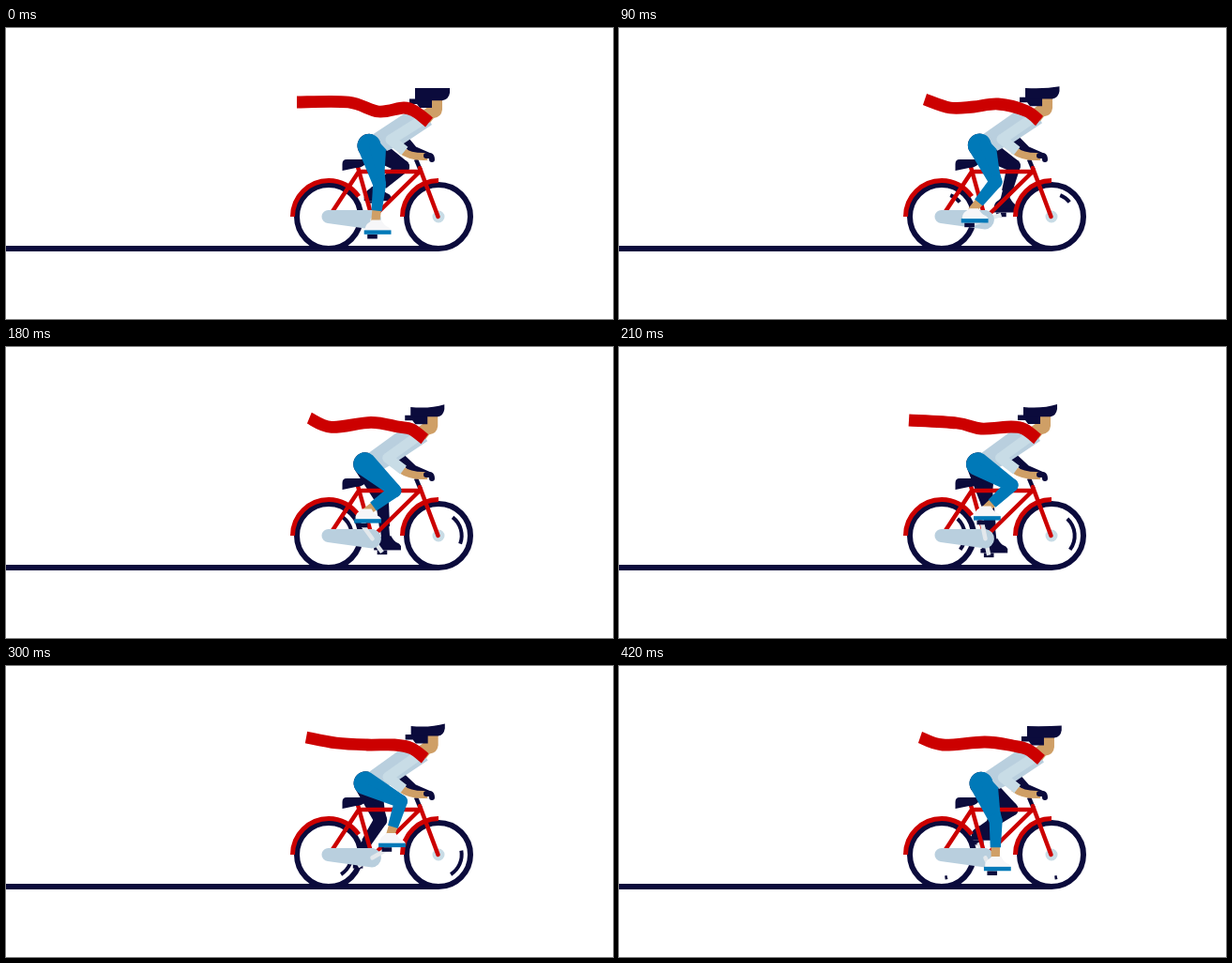
An HTML page with a canvas that plays this animation: 647 by 310 pixels, repeating every 0.45 s.

```html
<!DOCTYPE html>
<html lang="en">
<head>
<meta charset="utf-8">
<title>Cyclist</title>
<style>
html, body { margin: 0; width: 100%; height: 100%; overflow: hidden; background: #fff; }
canvas { display: block; width: 647px; height: 310px; }
</style>
</head>
<body>
<canvas id="stage" width="647" height="310"></canvas>
<script>
const ctx = document.getElementById('stage').getContext('2d');
const NAVY = '#0b0b3c', RED = '#cc0000', BLUE = '#0079b8', SKIN = '#cf9f66';
const STEEL = '#b9cfde', SLEEVE = '#c8dce6', PALE = '#e3e8ec', WHITE = '#f6f6f8';
const LOOP = 450, STEP = 30, TAU = Math.PI * 2, DEG = Math.PI / 180;
const REAR = [344, 201], FRONT = [461, 201], CRANK = [390.5, 204.3];

// Scarf wave, repeating twice per loop: time, then four x,y points from the tail.
const SCARF = [
  [0, 310, 79, 365, 79, 397, 89, 424, 85],
  [75, 320, 76, 352, 82, 385, 84, 414, 84],
  [90, 326, 76, 353, 85, 378, 84, 404, 81],
  [135, 329, 75, 357, 88, 392, 79, 418, 85],
  [150, 328, 75, 351, 88, 387, 79, 414, 85],
  [195, 321, 76, 345, 84, 390, 81, 420, 85],
  [210, 309, 78, 360, 81, 386, 87, 418, 85],
  [225, 310, 79, 365, 79, 397, 89, 424, 85]
];
// Wheel glint: time, start angle, end angle.
const GLINT = [
  [50, -76, -76], [90, -68, -39], [150, -58, 4], [210, -47, 37],
  [300, -10, 58], [360, 32, 68], [420, 76, 82], [440, 82, 82]
];

function sample(table, t) {
  let i = 1;
  while (i < table.length - 1 && table[i][0] < t) i++;
  const a = table[i - 1], b = table[i];
  const k = Math.min(1, Math.max(0, (t - a[0]) / (b[0] - a[0])));
  return a.slice(1).map((v, n) => v + (b[n + 1] - v) * k);
}

function fill(color, d) {
  ctx.fillStyle = color;
  ctx.fill(new Path2D(d));
}

function stroke(color, width, d, cap = 'butt') {
  ctx.strokeStyle = color;
  ctx.lineWidth = width;
  ctx.lineCap = cap;
  ctx.lineJoin = 'round';
  ctx.stroke(new Path2D(d));
}

function arc(color, width, [x, y], r, from = 0, to = 360) {
  ctx.beginPath();
  ctx.arc(x, y, r, from * DEG, to * DEG);
  ctx.strokeStyle = color;
  ctx.lineWidth = width;
  ctx.lineCap = 'butt';
  ctx.stroke();
}

// Tapered limb between two circles.
function limb(color, a, ra, b, rb, roundEnd = true) {
  const t = Math.atan2(b[1] - a[1], b[0] - a[0]);
  const at = (p, r, q) => [p[0] + r * Math.cos(q), p[1] + r * Math.sin(q)];
  ctx.beginPath();
  ctx.arc(a[0], a[1], ra, t + Math.PI / 2, t - Math.PI / 2);
  if (roundEnd) ctx.arc(b[0], b[1], rb, t - Math.PI / 2, t + Math.PI / 2);
  else {
    ctx.lineTo(...at(b, rb, t - Math.PI / 2));
    ctx.lineTo(...at(b, rb, t + Math.PI / 2));
  }
  ctx.closePath();
  ctx.fillStyle = color;
  ctx.fill();
}

function pedalPose(angle, hip) {
  const pedal = [CRANK[0] + 17.8 * Math.cos(angle), CRANK[1] + 17.8 * Math.sin(angle)];
  const sole = [pedal[0] + 5.5, pedal[1] - 4.5];
  const ankle = [sole[0] - 2, sole[1] - 11 - 2 * Math.sin(angle)];
  const dx = ankle[0] - hip[0], dy = ankle[1] - hip[1], d = Math.hypot(dx, dy);
  const thigh = 42.5, shin = 38.5;
  const a = (thigh * thigh + d * d - shin * shin) / (2 * d);
  const h = Math.sqrt(Math.max(0, thigh * thigh - a * a));
  const knee = [hip[0] + (dx * a + dy * h) / d, hip[1] + (dy * a - dx * h) / d];
  const len = Math.hypot(ankle[0] - knee[0], ankle[1] - knee[1]);
  const k = 1 - 10 / len;
  const cuff = [knee[0] + (ankle[0] - knee[0]) * k, knee[1] + (ankle[1] - knee[1]) * k];
  return { pedal, sole, ankle, knee, cuff };
}

function leg(p, hip, cloth, skin, shoe, soleColor) {
  const [x, y] = p.sole;
  ctx.fillStyle = NAVY;
  ctx.fillRect(p.pedal[0] - 5.3, p.pedal[1] - 2.2, 10.6, 4.6);
  limb(skin, p.cuff, 4.8, p.ankle, 4.6);
  ctx.save();
  ctx.translate(x, y);
  fill(shoe, 'M-13 -1V-5Q-12 -9 -8 -11L-6 -13L4 -13Q7 -7 11 -5.500Q14.500 -4 14.500 -1Z');
  ctx.fillStyle = soleColor;
  ctx.fillRect(-14.3, -2.2, 28.8, 4.4);
  ctx.restore();
  limb(cloth, hip, 12.5, p.knee, 7);
  fill(cloth, `M${hip[0] + 3} ${hip[1] - 12}L${hip[0] + 18} ${hip[1] + 4}L${p.knee[0] + 5} ${p.knee[1] - 5}L${p.knee}L${hip}Z`);
  limb(cloth, p.knee, 7, p.cuff, 5.6, false);
}

function wheel(c, glint) {
  arc(NAVY, 6, c, 34);
  if (glint[1] > glint[0]) arc(NAVY, 4, c, 24.7, glint[0], glint[1]);
}

function bike() {
  arc(RED, 5, REAR, 38.5, 180, 326);
  arc(RED, 5, FRONT, 38.5, 180, 270);
  stroke(NAVY, 4.5, 'M437 140L442 152');
  stroke(RED, 4.5, 'M375 148L389 198M347 197L376 153H442M441 153L395 198');
  stroke(RED, 4.5, 'M441 149L460.500 201', 'round');
  fill(NAVY, 'M363 140H383V145Q379 149 373 149L358.500 152V145Q358.500 140 363 140Z');
  fill(STEEL, 'M344 194H391A10.300 10.300 0 0 1 390 214.500L343 208A7 7 0 0 1 344 194Z');
}

function torso(s) {
  const x = -5 * s, y = -3 * s;
  const hx = -4.5 * s, hy = -0.5 * s;
  fill(STEEL, `M${390 + hx} ${114 + hy}L${428 + x} ${89 + y}L${447 + x} ${92 + y}L${454 + x} ${103 + y}L${424 + x} ${123 + y}L${406 + hx} ${131 + hy}Z`);
}

function frontArm(s) {
  const x = -5 * s, y = -3 * s;
  stroke(SKIN, 8, `M${421 + x * .2} 130Q431 138 449 137`);
  stroke(SLEEVE, 11, `M${442 + x} ${99 + y}L${410 + x * .7} ${119 + y * .3}L${425 + x * .3} 131`);
  stroke(NAVY, 6, 'M448 136H452Q454 137 454 140', 'round');
}

function head(s) {
  ctx.save();
  ctx.translate(-5 * s, -3 * s);
  fill(SKIN, 'M449 76H465V87Q464 95 456 96L452 101L440 91L450 84Z');
  fill(NAVY, 'M430 75.500H454V85H441L438 81H430Z');
  const q = 3 * s;
  fill(NAVY, `M436 ${64 + q}Q${458 - 2 * s} ${64 + q * 1.7} ${473 - s} 64V69Q${472 - s} 76 465 77.200H436Z`);
  ctx.restore();
}

function scarf(t, s) {
  const v = sample(SCARF, t % 225);
  const p = [0, 2, 4, 6].map(i => [v[i], v[i + 1]]);
  p.push([437 - 5 * s, 89.5 - 2 * s], [451 - 5 * s, 100.5 - 2.5 * s]);
  let d = `M${p[0]}`;
  for (let i = 0; i < p.length - 1; i++) {
    const a = p[i - 1] || p[i], b = p[i], c = p[i + 1], e = p[i + 2] || c;
    d += `C${b[0] + (c[0] - a[0]) / 6} ${b[1] + (c[1] - a[1]) / 6} ` +
         `${c[0] - (e[0] - b[0]) / 6} ${c[1] - (e[1] - b[1]) / 6} ${c}`;
  }
  stroke(RED, 12.8, d);
}

function draw(t) {
  const s = Math.sin(Math.PI * t / LOOP);
  const turn = TAU * (t / LOOP + .25);
  const hip = [387 - 4.5 * s, 125.3 - .5 * s];
  const near = pedalPose(turn, hip), far = pedalPose(turn + Math.PI, hip);
  const glint = sample(GLINT, t);

  ctx.fillStyle = '#fff';
  ctx.fillRect(0, 0, 647, 310);
  ctx.fillStyle = NAVY;
  ctx.fillRect(0, 232, 461, 6);
  wheel(REAR, glint);
  wheel(FRONT, glint);
  fill(SLEEVE, 'M454.500 201A6.500 6.500 0 0 1 467.500 201A6.500 6.500 0 0 1 454.500 201Z');

  stroke(NAVY, 9, `M${424 - 4 * s} ${118 - s}L434 130L450 137`);
  leg(far, hip, NAVY, NAVY, NAVY, NAVY);
  stroke(PALE, 4.5, `M${CRANK}L${far.pedal}`);
  bike();
  stroke(PALE, 4.5, `M${CRANK}L${near.pedal}`, 'round');
  torso(s);
  leg(near, hip, BLUE, SKIN, WHITE, BLUE);
  frontArm(s);
  head(s);
  scarf(t, s);
}

function tick(now) {
  draw(Math.floor(now % LOOP / STEP) * STEP);
  requestAnimationFrame(tick);
}
draw(0);
requestAnimationFrame(tick);
</script>
</body>
</html>
```
